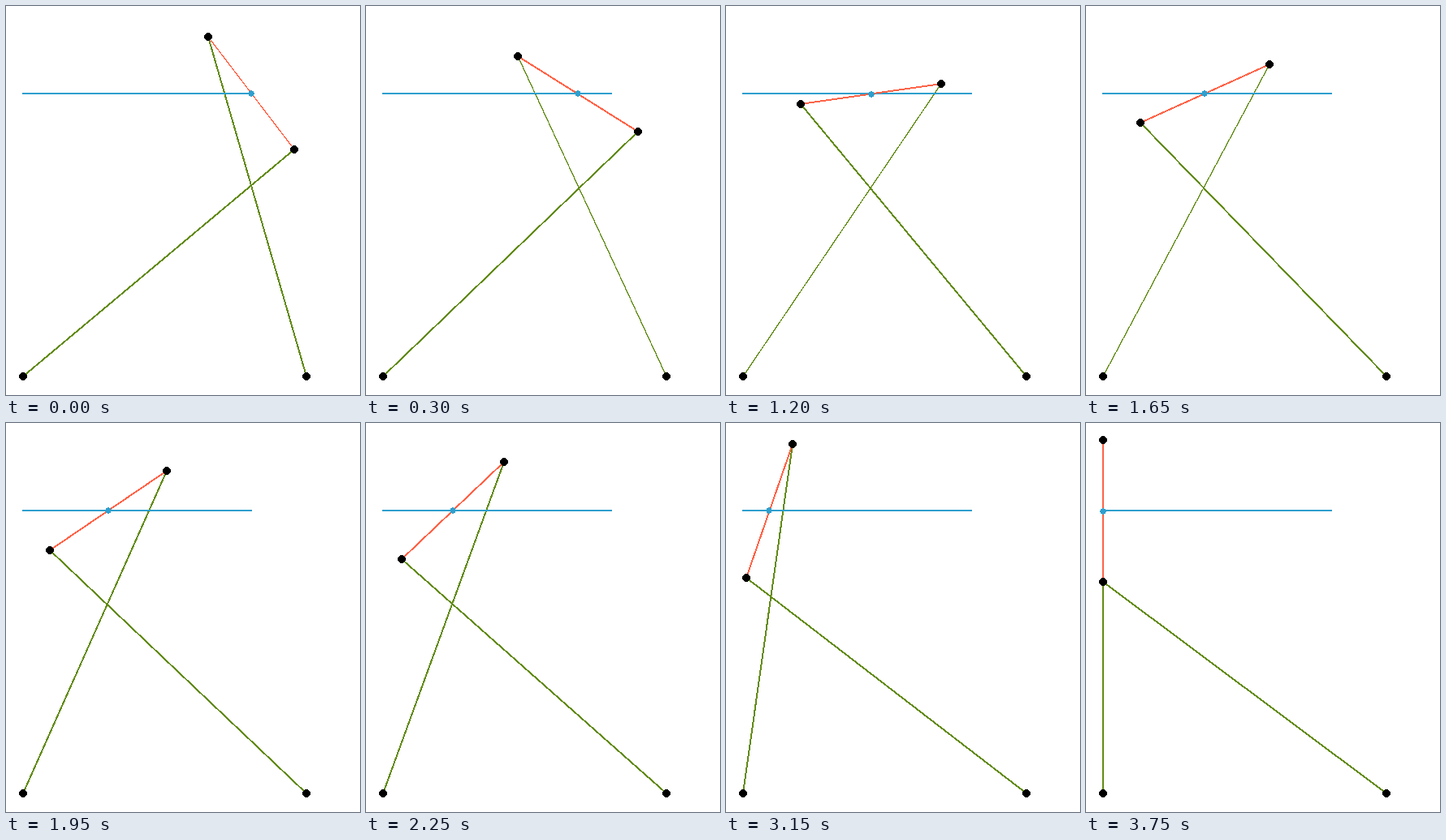
Write an HTML page with a canvas that moves like this. It is 436 px wide and 480 px high and loops after 3900 ms.

```html
<!DOCTYPE html>
<html lang="en">
<head>
<meta charset="utf-8">
<title>Straight-line linkage</title>
<style>
  html, body { margin: 0; overflow: hidden; background: #fff; }
  canvas { display: block; }
</style>
</head>
<body>
<canvas id="stage" width="436" height="480"></canvas>
<script>
const ctx = document.getElementById('stage').getContext('2d');
const STEP = 150, STEPS = 26;
const GREEN = '#628b14', RED = '#ff6347', BLUE = '#2f9fcd';

// Four-bar linkage with ground : rocker : coupler = 4 : 5 : 2
const UNIT = 87.2, ROCKER = 5 * UNIT, COUPLER = 2 * UNIT;
const left = { x: 21, y: 457.4 }, right = { x: 21 + 4 * UNIT, y: 457.4 };

const polar = (p, r, a) => ({ x: p.x + r * Math.cos(a), y: p.y + r * Math.sin(a) });
const snap = p => ({ x: Math.round(p.x), y: Math.round(p.y) });

// Hard-edged line, one run of pixels per step along its longer axis
function bar(a, b, color) {
  const dx = b.x - a.x, dy = b.y - a.y;
  const steep = Math.abs(dy) > Math.abs(dx);
  const n = Math.max(Math.abs(dx), Math.abs(dy));
  const lean = Math.abs(dx / dy);
  const weight = steep && lean > 0.45 && lean < 0.8 ? 1.3 : 2;
  const half = weight * Math.hypot(dx, dy) / n / 2;
  ctx.fillStyle = color;
  for (let i = 0; i < n; i++) {
    const t = (i + 0.5) / n, x = a.x + dx * t, y = a.y + dy * t;
    const mid = steep ? x : y;
    const from = Math.round(mid - half), size = Math.round(mid + half) - from;
    if (steep) ctx.fillRect(from, Math.floor(y), size, 1);
    else ctx.fillRect(Math.floor(x), from, 1, size);
  }
}

// Hard-edged disc, filled row by row
function dot(p, r, color) {
  const { x, y } = snap(p), rows = Math.ceil(r);
  ctx.fillStyle = color;
  for (let i = -rows; i < rows; i++) {
    const half = Math.round(Math.sqrt(Math.max(0, r * r - (i + 0.5) ** 2)));
    ctx.fillRect(x - half, y + i, 2 * half, 1);
  }
}

function draw(step) {
  const p = polar(left, ROCKER, -(40 + 2 * step) * Math.PI / 180);
  const dx = right.x - p.x, dy = right.y - p.y, d = Math.hypot(dx, dy);
  const bend = Math.acos((COUPLER ** 2 + d ** 2 - ROCKER ** 2) / (2 * COUPLER * d));
  const q = polar(p, COUPLER, Math.atan2(dy, dx) + bend);
  const mid = { x: (p.x + q.x) / 2, y: (p.y + q.y) / 2 };
  const joints = [left, right, p, q].map(snap);
  const [l, r, a, b] = joints;

  ctx.fillStyle = '#fff';
  ctx.fillRect(0, 0, 436, 480);
  bar(l, a, GREEN);
  bar(r, b, GREEN);
  ctx.fillStyle = BLUE;
  ctx.fillRect(20, 107, 283, 2);
  bar(a, b, RED);
  for (const joint of joints) dot(joint, 4.8, '#000');
  dot(mid, 3.7, BLUE);
}

function tick() {
  draw(Math.floor(performance.now() / STEP) % STEPS);
  requestAnimationFrame(tick);
}
tick();
</script>
</body>
</html>
```
